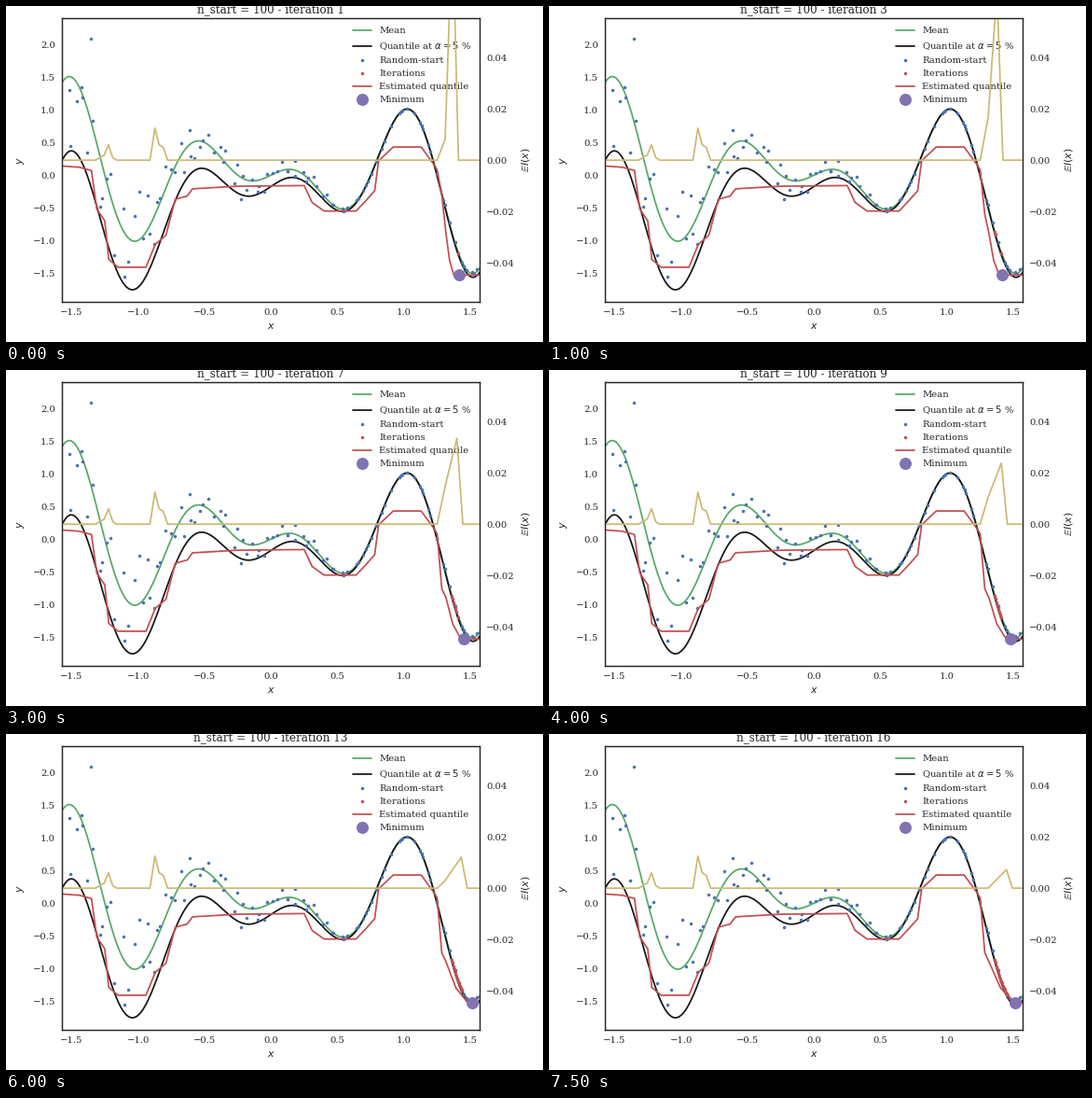
Write a matplotlib script that moves like this. It is 576 by 360 pixels and loops after 8 s.

```python
import numpy as np
import matplotlib.pyplot as plt
from matplotlib.animation import FuncAnimation

W, H, DPI = 576, 360, 72
LEFT, RIGHT, TOP, BOTTOM = 60.2, 508.2, 13.2, 317.2
BLUE, GREEN, RED, PURPLE, SAND, INK = (
    "#4C72B0", "#55A868", "#C44E52", "#8172B2", "#CCB974", "#262626")
STEPS, STARTS = 16, 100
EDGE = np.pi / 2
FLOOR = -1.53

plt.rcParams.update({
    "font.family": "DejaVu Serif", "font.size": 10,
    "mathtext.fontset": "dejavusans",
    "axes.edgecolor": INK, "axes.labelcolor": INK, "text.color": INK,
    "xtick.color": INK, "ytick.color": INK,
    "axes.linewidth": 1.25, "axes.labelsize": 11, "axes.titlesize": 12,
    "xtick.major.size": 0, "ytick.major.size": 0,
    "xtick.major.pad": 7, "ytick.major.pad": 7,
    "lines.linewidth": 1.75, "lines.markersize": 7,
    "lines.markeredgewidth": 0, "lines.solid_capstyle": "round",
})


def mean(x):
    return x * np.cos(2 * np.pi * x)


def spread(x):
    """Gap between the mean and the 5 % quantile."""
    return 0.185 * (x - 0.97) ** 2


def start_samples():
    """Evenly jittered x, normal noise matching the quantile gap."""
    rng = np.random.default_rng(8)
    x = np.linspace(-EDGE, EDGE, STARTS) + rng.uniform(-0.03, 0.03, STARTS)
    return x, mean(x) + spread(x) / 1.645 * rng.standard_normal(STARTS)


# Corners of the estimate that stay put, left of the final descent.
CORNERS = [
    (-EDGE, 0.14), (-1.44, 0.12), (-1.35, 0.07), (-1.31, -0.52), (-1.25, -0.7),
    (-1.22, -1.29), (-1.15, -1.41), (-0.94, -1.41), (-0.87, -1.06),
    (-0.79, -0.92), (-0.72, -0.37), (-0.63, -0.32), (-0.59, -0.21),
    (-0.25, -0.17), (0.25, -0.16), (0.31, -0.42), (0.4, -0.55), (0.64, -0.55),
    (0.71, -0.4), (0.78, -0.24), (0.81, 0.22), (0.92, 0.43), (1.13, 0.43),
    (1.23, 0.15)]


def estimate(step):
    """The descent gains a shelf and reaches the floor later each step."""
    end = 1.375 + 0.009 * (step - 1)
    drop = max(-0.76, -0.15 - 0.15 * step)
    bend = 1.317
    descent = [(1.25, 0.08), (1.285, drop), (bend, -0.9),
               (bend + 0.45 * (end - bend), -1.3), (end, FLOOR), (EDGE, FLOOR)]
    return np.transpose(CORNERS + descent)


def improvement(step):
    """Two fixed bumps and a right-hand peak that decays and drifts."""
    peak = 1.36 + 0.0055 * step
    height = 0.11 * np.exp(-0.17 * step)
    shoulder = 0.45 * height * np.sin(np.pi * step / STEPS)
    return np.transpose([
        (-EDGE, 0), (-1.32, 0), (-1.254, 0.002), (-1.222, 0.006),
        (-1.19, 0.001), (-1.16, 0), (-0.91, 0), (-0.873, 0.0125),
        (-0.841, 0.006), (-0.81, 0.005), (-0.777, 0),
        (1.25, 0), (1.31, shoulder), (peak, height), (peak + 0.045, 0), (EDGE, 0)])


def best_x(step):
    return 1.416 + 0.032 * ((step - 1) // 4)


fig = plt.figure(figsize=(W / DPI, H / DPI), dpi=DPI, facecolor="white")
ax = fig.add_axes([LEFT / W, 1 - BOTTOM / H, (RIGHT - LEFT) / W, (BOTTOM - TOP) / H])
ax.set(xlim=(-EDGE, EDGE), ylim=(-1.943, 2.4))
ax.set_xticks(np.arange(-1.5, 1.6, 0.5))
ax.set_yticks(np.arange(-1.5, 2.1, 0.5))
ax.set_xlabel("$x$", labelpad=5)
ax.set_ylabel("$y$", labelpad=6.5)
title = ax.set_title("", pad=6)

xs = np.linspace(-EDGE, EDGE, 500)
ax.plot(xs, mean(xs), color=GREEN, label="Mean")
ax.plot(xs, mean(xs) - spread(xs), color="#151515",
        label=r"Quantile at $\alpha = 5$ %")
ax.plot(*start_samples(), ".", color=BLUE, label="Random-start")
picks, = ax.plot([], [], ".", color=RED, label="Iterations")
est, = ax.plot([], [], color=RED, label="Estimated quantile")
best, = ax.plot([], [], "o", color=PURPLE, ms=13, label="Minimum")
ax.legend(loc="upper right", frameon=False, numpoints=1)

twin = ax.twinx()
twin.set_ylim(-0.0553, 0.0553)
twin.set_yticks(np.linspace(-0.04, 0.04, 5))
twin.yaxis.set_major_formatter("{x:.2f}")
twin.set_ylabel(r"$\mathbb{E}I(x)$", labelpad=5)
ei, = twin.plot([], [], color=SAND)

pick_x = np.append(1.41, np.linspace(1.36, 1.46, STEPS - 1))


def update(i):
    step = i + 1
    title.set_text(f"n_start = {STARTS} - iteration {step}")
    picks.set_data(pick_x[:step], mean(pick_x[:step]))
    est.set_data(*estimate(step))
    best.set_data([best_x(step)], [FLOOR])
    ei.set_data(*improvement(step))
    return title, picks, est, best, ei


anim = FuncAnimation(fig, update, frames=STEPS, interval=500, repeat=True,
                     repeat_delay=0, blit=False)
plt.show()
```
